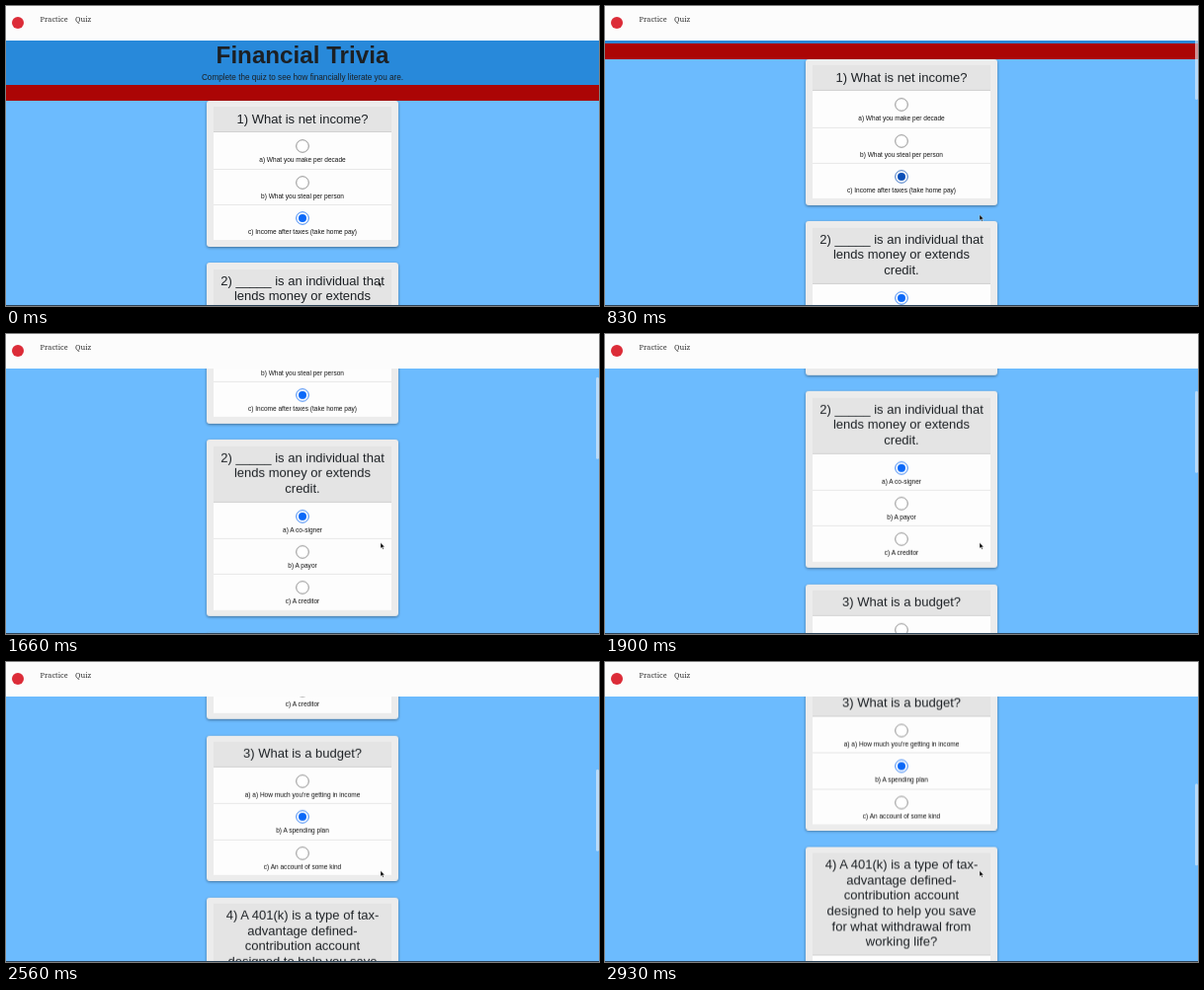
An HTML page for the animation above (2.96 s loop, 600 px wide and 304 px high).

```html
<!DOCTYPE html>
<html lang="en">
<head>
<meta charset="utf-8">
<title>Financial Trivia</title>
<style>
html, body { margin: 0; width: 100%; height: 100%; overflow: hidden; }
#stage { position: relative; width: 600px; height: 304px; overflow: hidden; background: #6cbbfe;
  font-family: "Liberation Sans", Arial, sans-serif; color: #1c2024; text-align: center; }
#stage > *, #page > * { position: absolute; }
#page { left: 0; top: 0; width: 600px; will-change: transform; }
#banner { top: 0; width: 600px; height: 80px; background: #2889da; }
#stripe { top: 80px; width: 600px; height: 16px; background: #ab0505; }
h1 { top: 34px; width: 600px; margin: 0; font-size: 24.2px; line-height: 31px; }
#intro { top: 67px; width: 600px; margin: 0; font-size: 8.17px; line-height: 12px; }
#cards { top: 96px; left: 203px; width: 194px; }
.card { padding: 6.4px 6.8px; margin-bottom: 16.4px; border-radius: 3px; background: #ececec;
  box-shadow: 0 1px 3px rgba(0, 0, 0, .42); }
h2 { margin: 0; padding: 4.2px 0 6.2px; font-size: 13px; font-weight: 400; line-height: 15.6px;
  background: #e4e4e4; box-shadow: inset 0 -.8px #cbcbcb; }
.row { position: relative; height: 36.35px; background: #fdfdfd; color: #111;
  font-size: 6.54px; line-height: 8px; }
.row + .row { box-shadow: inset 0 .8px #e2e2e2; }
.row span { position: absolute; left: 0; width: 100%; top: 24px; }
.row svg { position: absolute; left: 50%; top: 7px; margin-left: -7px; }
.row circle { fill: #fff; stroke: #777; stroke-width: .8; }
.row .dot { fill: none; stroke: none; }
.on circle { stroke: #0b68f2; }
.on .dot { fill: #0b68f8; }
.hover circle { stroke: #0a4fb4; }
.hover .dot { fill: #0a4fb8; }
#thumb { left: 596.5px; top: 0; width: 3px; height: 83px; border-radius: 2px; background: rgba(235, 240, 246, .6); }
#nav { left: 0; top: 0; width: 600px; height: 35px; background: #fcfcfc; color: #333;
  font: 7.4px/12px "Noto Serif", Georgia, serif; }
#nav * { position: absolute; top: 7px; }
#nav i { left: 6px; top: 11px; width: 12px; height: 12px; border-radius: 50%; background: #dc2c38; }
#edge { left: 0; top: 303px; width: 600px; height: 1px; background: #2c4358; }
#cursor { left: 0; top: 0; }
</style>
</head>
<body>
<div id="stage">
  <div id="page">
    <div id="banner"></div>
    <div id="stripe"></div>
    <h1>Financial Trivia</h1>
    <p id="intro">Complete the quiz to see how financially literate you are.</p>
    <div id="cards"></div>
  </div>
  <div id="thumb"></div>
  <div id="nav"><i></i><span style="left:34.5px">Practice</span><span style="left:70px">Quiz</span></div>
  <div id="edge"></div>
  <svg id="cursor" width="8" height="10"><path d="M.5 .5V6.2L1.8 5.1 2.8 7.2 3.7 6.8 2.8 4.8H4.6Z" fill="#000" stroke="#fff" stroke-width=".4"/></svg>
</div>
<script>
const LOOP = 2960;
const $ = id => document.getElementById(id);

// Each question: title, options, index of the chosen option.
const questions = [
  ['1) What is net income?',
    ['a) What you make per decade', 'b) What you steal per person', 'c) Income after taxes (take home pay)'], 2],
  ['2) _____ is an individual that<br>lends money or extends<br>credit.',
    ['a) A co-signer', 'b) A payor', 'c) A creditor'], 0],
  ["3) What is a budget?",
    ["a) a) How much you're getting in income", 'b) A spending plan', 'c) An account of some kind'], 1],
  ['4) A 401(k) is a type of tax-<br>advantage defined-<br>contribution account<br>designed to help you save<br>for what withdrawal from<br>working life?',
    ['', '', ''], -1]
];

const row = (text, on) => `<div class="row${on ? ' on' : ''}">
  <svg width="14" height="14"><circle cx="7" cy="7" r="6.3"/><circle class="dot" cx="7" cy="7" r="4"/></svg>
  <span>${text}</span></div>`;

$('cards').innerHTML = questions.map(([title, options, chosen]) =>
  `<div class="card"><h2>${title}</h2>${options.map((o, i) => row(o, i === chosen)).join('')}</div>`).join('');

const hovered = document.querySelector('.on');

// Scroll offset over time, joined by a smooth monotone curve.
const keys = [[0, 0], [300, 0], [830, 42], [1260, 90], [1660, 153], [2160, 264], [2560, 381], [2930, 432.5], [LOOP, 432.5]];
const slope = i => (keys[i + 1][1] - keys[i][1]) / (keys[i + 1][0] - keys[i][0]);
const tangents = keys.map((_, i) => {
  if (i === 0 || i === keys.length - 1) return 0;
  const a = slope(i - 1), b = slope(i);
  return a * b > 0 ? 2 * a * b / (a + b) : 0;
});

function scrollAt(t) {
  let i = 0;
  while (i < keys.length - 2 && t >= keys[i + 1][0]) i++;
  const [t0, y0] = keys[i], [t1, y1] = keys[i + 1];
  const h = t1 - t0, u = (t - t0) / h, v = 1 - u;
  return y0 * (1 + 2 * u) * v * v + y1 * u * u * (3 - 2 * u)
    + h * u * v * (tangents[i] * v - tangents[i + 1] * u);
}

function ease(t, from, to) {
  const u = Math.min(1, Math.max(0, (t - from) / (to - from)));
  return u * u * (3 - 2 * u);
}

function draw(t) {
  const y = scrollAt(t), k = ease(t, 30, 320);
  $('page').style.transform = `translateY(${-y}px)`;
  $('thumb').style.transform = `translateY(${y * .285}px)`;
  $('thumb').style.opacity = y > 0 ? 1 : 0;
  $('cursor').style.transform = `translate(${376 + 2.5 * k}px, ${278 - 67 * k}px)`;
  hovered.classList.toggle('hover', t > 250 && t < 1000);
}

const start = performance.now();
function tick() {
  draw((performance.now() - start) % LOOP);
  requestAnimationFrame(tick);
}
tick();
</script>
</body>
</html>
```
